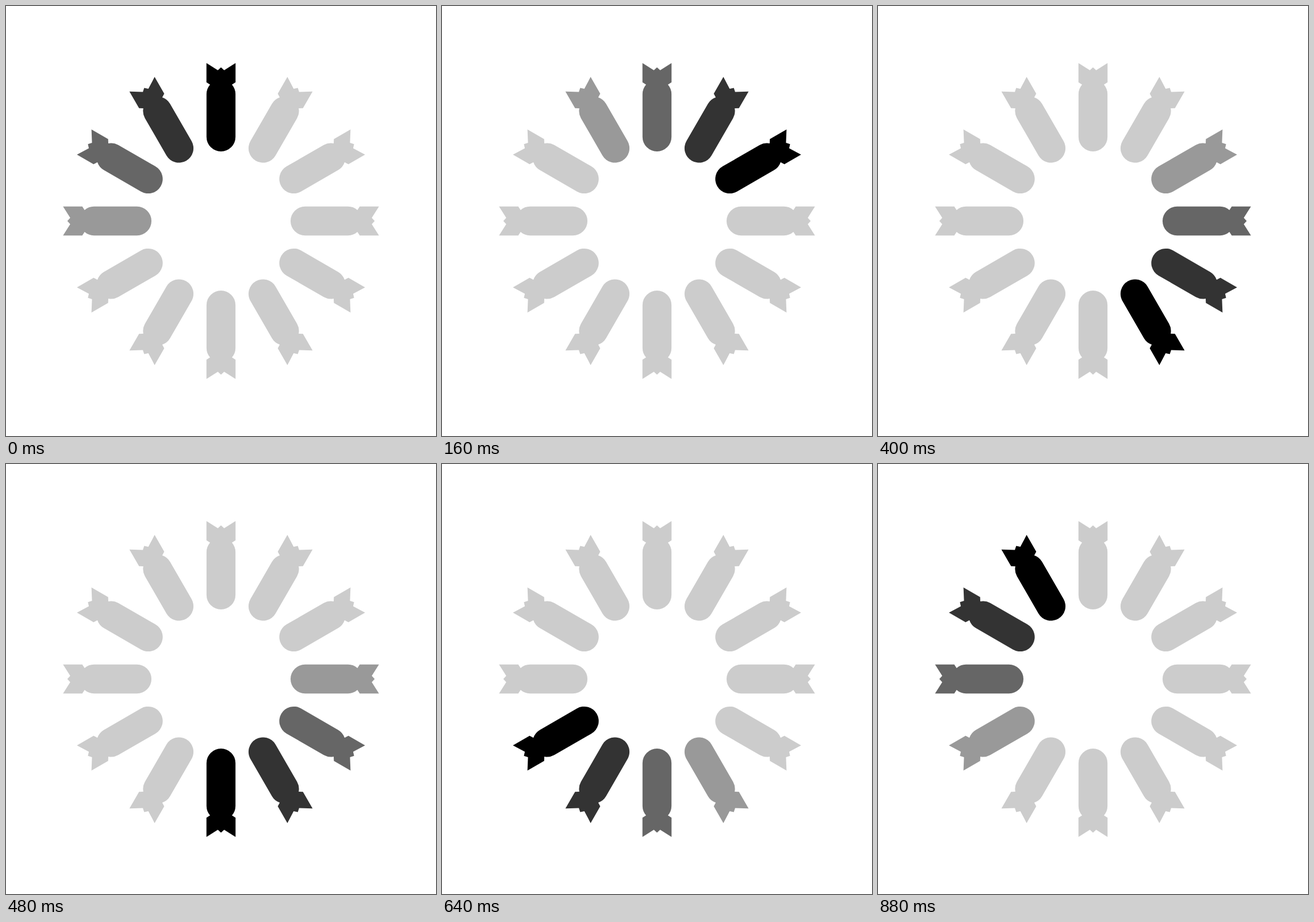
These frames come from a looping animation (748 by 748 pixels, 0.96 s). An HTML page:

```html
<!DOCTYPE html>
<html lang="en">
<head>
<meta charset="utf-8">
<style>
  html, body { margin: 0; width: 100%; height: 100%; overflow: hidden; background: #fff; }
  svg { display: block; width: 100vw; height: 100vh; }
</style>
</head>
<body>
<svg id="stage" viewBox="-374 -374 748 748"></svg>
<script>
const COUNT = 12, STEP_MS = 80;
// One bomb pointing at the centre: tail fins, neck, rounded body
const BOMB = `M-25.3 -274.8 L-5.5 -262.3 L0 -267.3 L5.5 -262.3 L25.3 -274.8
  V-241.3 L19 -237.3 A25.2 25.2 0 0 1 25.2 -221 V-146.2
  A25.2 25.2 0 0 1 -25.2 -146.2 V-221 A25.2 25.2 0 0 1 -19 -237.3 L-25.3 -241.3 Z`;

const stage = document.getElementById('stage');
const bombs = Array.from({ length: COUNT }, (_, i) => {
  const path = document.createElementNS(stage.namespaceURI, 'path');
  path.setAttribute('d', BOMB);
  path.setAttribute('transform', `rotate(${i * 360 / COUNT})`);
  return stage.appendChild(path);
});

function draw(now) {
  const lead = Math.floor(now / STEP_MS) % COUNT;
  bombs.forEach((bomb, i) => {
    const age = (lead - i + COUNT) % COUNT;
    const grey = Math.min(age, 4) * 51;
    bomb.setAttribute('fill', `rgb(${grey},${grey},${grey})`);
  });
}

const start = performance.now();
function tick() {
  draw(performance.now() - start);
  requestAnimationFrame(tick);
}
tick();
</script>
</body>
</html>
```
